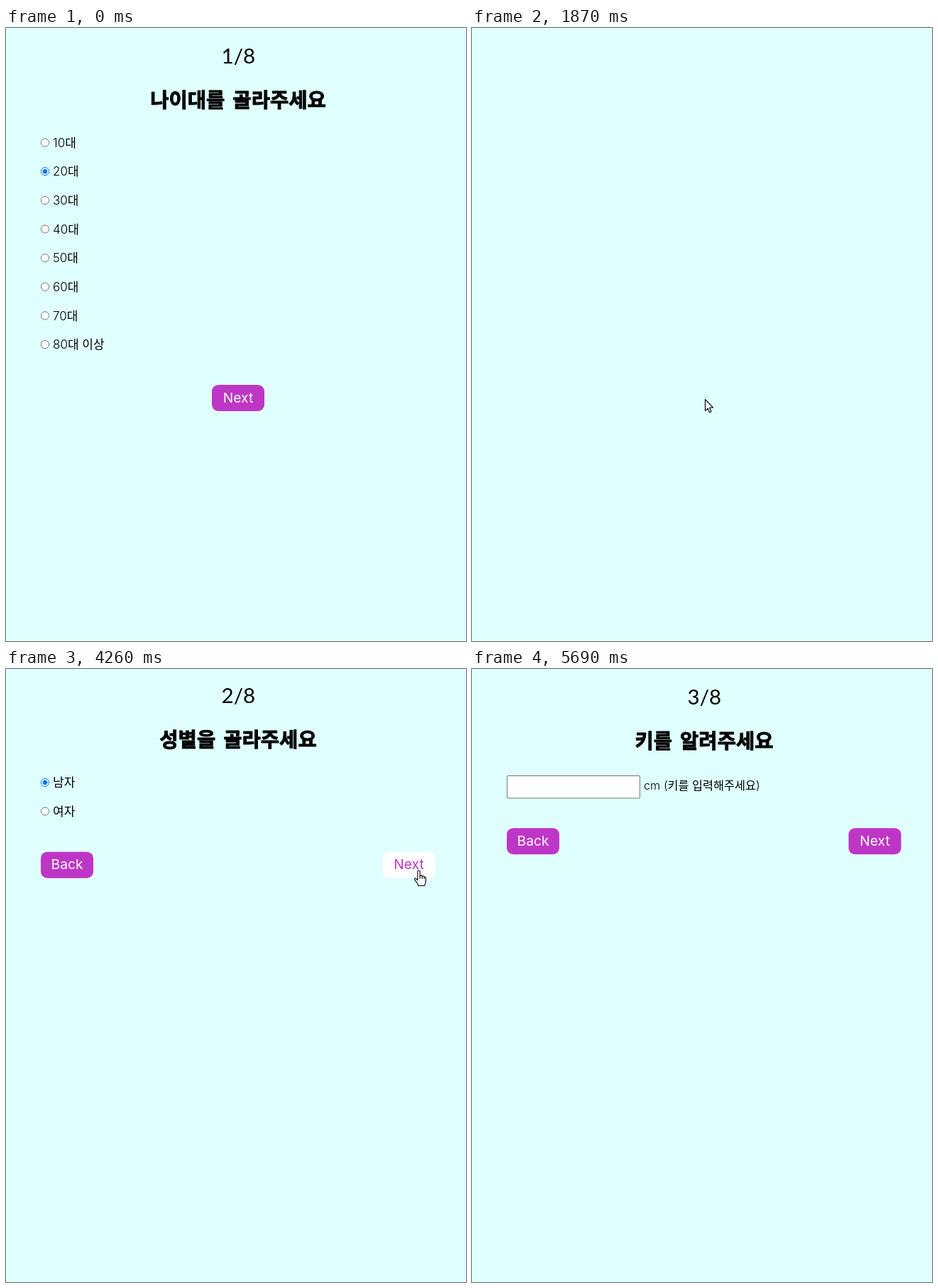
Animation, 648 px wide and 864 px high, one loop 5830 ms. Source, as an HTML page with a canvas:

```html
<!DOCTYPE html>
<html lang="ko">
<head>
<meta charset="utf-8">
<title>Survey</title>
<style>
  html, body { margin: 0; width: 100%; height: 100%; overflow: hidden; background: #e0ffff; }
  canvas { display: block; width: 100vw; height: 100vh; }
</style>
</head>
<body>
<canvas id="stage" width="648" height="864"></canvas>
<script>
const ctx = document.getElementById('stage').getContext('2d');
const W = 648, H = 864, LOOP = 5830, STEP = 1000 / 15;
const PURPLE = '#be36c6', CYAN = '#e0ffff', BLUE = '#0075ff', GRAY = '#767676';
const KOREAN = '"Noto Sans CJK KR", "Noto Sans CJK", sans-serif';
const UI = 'Inter, ' + KOREAN;
const BTN = { w: 74, h: 37 };
const POINTER_IN = 130, POINTER_OUT = 5690, PICK = 3000;

// Pointer stops; the moves between them are eased
const STOPS = [
  { t: 130, x: 532, y: 831 },
  { t: 400, x: 312, y: 648 },
  { t: 660, x: 321, y: 523 },
  { t: 1300, x: 322, y: 521 },
  { t: 1870, x: 328, y: 523 },
  { t: 2330, x: 328, y: 508 },
  { t: 2900, x: 55, y: 163 },
  { t: 3110, x: 56, y: 165 },
  { t: 3590, x: 579, y: 275 },
  { t: 4280, x: 581, y: 283 },
  { t: 4810, x: 636, y: 848 }
];

const next = (x, y) => ({ label: 'Next', x, y });
const backAndNext = y => [{ label: 'Back', x: 49, y }, next(530.5, y)];
const PAGES = [
  {
    title: '나이대를 골라주세요',
    options: Array.from({ length: 8 }, (_, i) => `${i + 1}0대${i === 7 ? ' 이상' : ''}`),
    picked: () => 1,
    buttons: [next(290, 503)],
    enter: -1000, leave: 1469
  },
  {
    title: '성별을 골라주세요',
    options: ['남자', '여자'],
    picked: t => t >= PICK ? 0 : -1,
    buttons: backAndNext(259.2),
    enter: 2063, leave: 4600
  },
  {
    title: '키를 알려주세요',
    options: [],
    field: 'cm (키를 입력해주세요)',
    buttons: backAndNext(224.2),
    enter: 5063, leave: LOOP * 2
  }
];

const arrow = new Path2D('M0 0V16L3.7 12.7L6.2 18.3L8.5 17.3L6.1 11.7L11 11.4Z');
const hand = new Path2D(
  'M-1.7 1.6Q0 -1 1.7 1.6V8Q3.8 6.4 4.8 8.7Q6.7 7.4 7.7 9.6Q9.7 8.9 9.9 11.3V15' +
  'Q9.7 18.5 8 22H-.5Q-2 18 -5.6 14Q-6.4 11 -4 11.8L-1.7 14Z');
const knuckles = new Path2D('M1.7 8V12M4.8 8.7V12.2M7.7 9.6V12.6');

const smooth = u => u * u * (3 - 2 * u);

// The screen refreshes 15 times a second, slightly ahead of the beat
const held = t => Math.floor(t / STEP + 0.22) * STEP;

function pointerAt(t) {
  const i = STOPS.findIndex(s => s.t > t);
  const b = STOPS.at(i), a = i > 0 ? STOPS[i - 1] : b;
  const u = b === a ? 0 : smooth((t - a.t) / (b.t - a.t));
  return [a.x + (b.x - a.x) * u, a.y + (b.y - a.y) * u];
}

// Pages rise in with a cubic ease-out and leave upward exponentially
function pageShift(page, t) {
  const rise = H * (1 - Math.min(1, (t - page.enter) / 230)) ** 3;
  const exit = 133.5 * 2 ** ((t - page.leave) / 52);
  return rise - (exit < 0.5 ? 0 : exit);
}

function text(str, x, y, font, color = '#000', align = 'left') {
  ctx.font = font;
  ctx.fillStyle = color;
  ctx.textAlign = align;
  ctx.fillText(str, x, y);
}

function heading(str) {
  ctx.save();
  ctx.wordSpacing = '4.5px';
  ctx.lineWidth = 0.9;
  ctx.lineJoin = 'round';
  ctx.strokeStyle = '#000';
  text(str, 327, 112, `900 28.6px ${KOREAN}`, '#000', 'center');
  ctx.strokeText(str, 327, 112);
  ctx.restore();
}

function disc(x, y, r, fill, stroke = fill) {
  ctx.beginPath();
  ctx.arc(x, y, r, 0, 2 * Math.PI);
  ctx.fillStyle = fill;
  ctx.fill();
  ctx.strokeStyle = stroke;
  ctx.lineWidth = 1;
  ctx.stroke();
}

function box(x, y, w, h, r, fill) {
  ctx.fillStyle = fill;
  ctx.beginPath();
  ctx.roundRect(x, y, w, h, r);
  ctx.fill();
}

function drawButton(b, hovered) {
  box(b.x, b.y, BTN.w, BTN.h, 9, hovered ? '#fff' : PURPLE);
  text(b.label, b.x + BTN.w / 2, b.y + 24.5, `400 19.2px ${UI}`, hovered ? PURPLE : '#fff', 'center');
}

function drawOption(label, y, on) {
  disc(55, y, 5.6, '#fff', on ? BLUE : GRAY);
  if (on) disc(55, y, 3, BLUE);
  text(label, 66, y + 6.2, `300 17px ${UI}`);
}

function drawPage(page, index, t, shift, hovered) {
  ctx.save();
  ctx.translate(0, shift);
  text(`${index + 1}/8`, 327.3, 49.5, '400 29.5px Lato, sans-serif', '#000', 'center');
  heading(page.title);
  page.options.forEach((label, i) => drawOption(label, 161.5 + 40.65 * i, page.picked(t) === i));
  if (page.field) {
    box(49, 150, 188, 32.5, 2, GRAY);
    box(50, 151, 186, 30.5, 1, '#fff');
    text(page.field, 242, 170.3, `300 16.3px ${UI}`);
  }
  page.buttons.forEach(b => drawButton(b, b === hovered));
  ctx.restore();
}

function drawPointer(x, y, isHand) {
  ctx.save();
  ctx.translate(x + 0.5, y + 0.5);
  ctx.fillStyle = '#fff';
  ctx.strokeStyle = '#000';
  ctx.lineWidth = 1.1;
  ctx.lineJoin = 'round';
  const shape = isHand ? hand : arrow;
  ctx.fill(shape);
  ctx.stroke(shape);
  if (isHand) ctx.stroke(knuckles);
  ctx.restore();
}

function draw(t, showPointer) {
  ctx.fillStyle = CYAN;
  ctx.fillRect(0, 0, W, H);
  const [px, py] = showPointer ? pointerAt(t) : [-99, -99];
  let isHand = false;
  PAGES.forEach((page, i) => {
    const shift = pageShift(page, t);
    if (Math.abs(shift) > H) return;
    const hovered = page.buttons.find(b =>
      px >= b.x && px <= b.x + BTN.w && py >= b.y + shift && py <= b.y + BTN.h + shift);
    isHand = isHand || !!hovered;
    drawPage(page, i, t, shift, hovered);
  });
  if (showPointer) drawPointer(px, py, isHand);
}

const start = performance.now();
function tick() {
  const t = (performance.now() - start) % LOOP;
  draw(held(t), t >= POINTER_IN && t < POINTER_OUT);
  requestAnimationFrame(tick);
}
tick();
</script>
</body>
</html>
```
